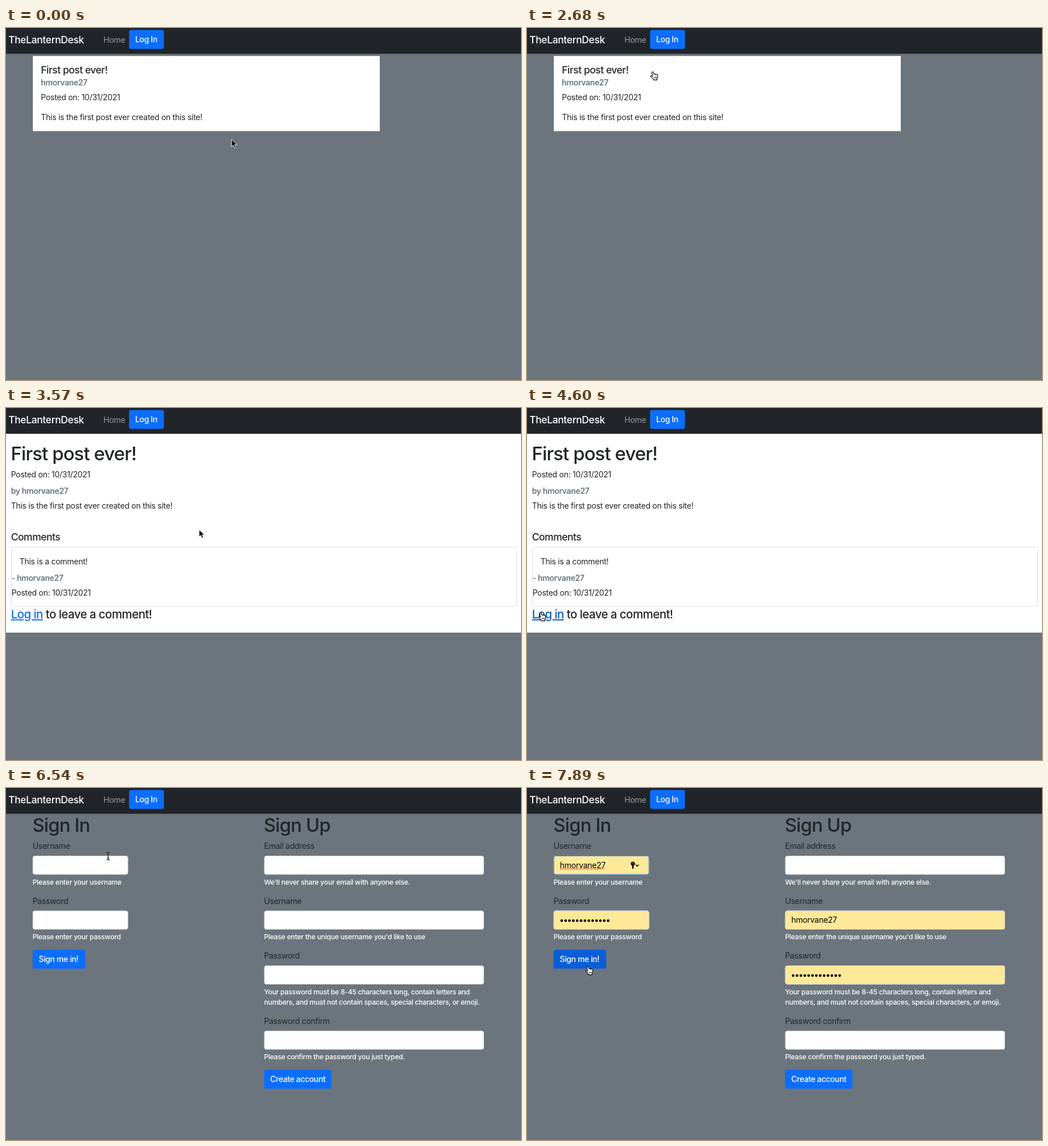
An HTML page for the animation above (8 s loop, 905 by 619 pixels).

```html
<!DOCTYPE html>
<html lang="en">
<head>
<meta charset="utf-8">
<title>Forum walkthrough</title>
<style>
  html, body { margin: 0; width: 100%; height: 100%; overflow: hidden; background: #6c757d; }
  svg { display: block; }
  text { font: 14px Inter, "Open Sans", sans-serif; letter-spacing: -.0195em; fill: #212529; white-space: pre; }
  .brand { font-size: 17.4px; font-weight: 550; fill: #fff; }
  .nav { fill: #9b9d9f; }
  .h1 { font-size: 32.8px; font-weight: 500; letter-spacing: -.026em; }
  .h4 { font-size: 20.5px; font-weight: 550; letter-spacing: -.028em; }
  .h5 { font-size: 17.5px; font-weight: 550; letter-spacing: -.028em; }
  .muted { font-weight: 600; letter-spacing: -.026em; fill: #6c757d; }
  .help { font-size: 12.2px; font-weight: 500; letter-spacing: -.022em; fill: #fff; }
  .btn { font-weight: 550; letter-spacing: -.028em; fill: #fff; }
  .fill { fill: #000; }
  #link { fill: #0d6efd; text-decoration: underline; }
</style>
</head>
<body>
<svg id="stage" width="905" height="619" viewBox="0 0 905 619"></svg>
<script>
const BRAND = "TheLanternDesk", USER = "hmorvane27";
const POSTED = "Posted on: 10/31/2021", BODY = "This is the first post ever created on this site!";
const BLUE = "#0d6efd", YELLOW = "#fee998";

const text = (x, y, str, cls = "") => `<text x="${x}" y="${y}" class="${cls}">${str}</text>`;
const box = (x, y, w, h, fill, extra = "") =>
  `<rect x="${x}" y="${y}" width="${w}" height="${h}" fill="${fill}" ${extra}/>`;
const input = (x, y, w, fill = "#fff", stroke = "#ced4da") =>
  box(x + .5, y + .5, w - 1, 32.5, fill, `rx="3.5" stroke="${stroke}"`);
const button = (x, y, w, str, id = "") =>
  box(x, y, w, 33.3, BLUE, `rx="3.5" id="${id}"`) + text(x + 10.8, y + 21.8, str, "btn");
const dots = (x, y) =>
  `<path d="M${x} ${y}h82" stroke="#000" stroke-width="4.8" stroke-linecap="round" stroke-dasharray="0 6.8"/>`;
const group = (id, ...parts) => `<g id="${id}">${parts.join("")}</g>`;

// One labelled field: label, input, then help lines
const field = (x, y, w, label, ...help) =>
  text(x, y, label) + input(x, y + 12, w) +
  help.map((line, i) => text(x, y + 62.5 + i * 18.4, line, "help")).join("");

const R = 453.5, RW = 386.5;

stage.innerHTML = [
  box(0, 0, 905, 619, "#6c757d"),
  group("list",
    box(47, 49, 610, 132.5, "#fff"),
    box(47.5, 49.5, 609.5, 131.5, "none", 'stroke="#000" stroke-opacity=".125"'),
    text(61.3, 80, "First post ever!", "h5"),
    text(61.3, 101, USER, "muted"),
    text(61.3, 127, POSTED),
    text(61.3, 162, BODY)),
  group("post",
    box(0, 45, 905, 350, "#fff"),
    text(8.5, 92, "First post ever!", "h1"),
    text(8.7, 122, POSTED),
    text(8.7, 150.5, "by " + USER, "muted"),
    text(8.7, 176.5, BODY),
    text(8.7, 233, "Comments", "h5"),
    box(9.5, 244.5, 888, 104.5, "#fff", 'rx="3.5" stroke="#dfdfdf"'),
    text(23.7, 275, "This is a comment!"),
    text(9.7, 303.5, "- " + USER, "muted"),
    text(9.7, 329.5, POSTED),
    text(8.7, 369.5, '<tspan id="link">Log in</tspan> to leave a comment!', "h4")),
  group("forms",
    text(46.5, 77, "Sign In", "h1"),
    field(46.7, 107, 168, "Username", "Please enter your username"),
    field(46.7, 203.5, 168, "Password", "Please enter your password"),
    button(46.7, 284.4, 92.5, "Sign me in!", "submit"),
    text(R - .5, 77, "Sign Up", "h1"),
    field(R, 107, RW, "Email address", "We'll never share your email with anyone else."),
    field(R, 203.5, RW, "Username", "Please enter the unique username you'd like to use"),
    field(R, 300, RW, "Password", "Your password must be 8-45 characters long, contain letters and",
      "numbers, and must not contain spaces, special characters, or emoji."),
    field(R, 414.7, RW, "Password confirm", "Please confirm the password you just typed."),
    button(R, 495.5, 118.5, "Create account"),
    group("filled",
      input(46.7, 119, 168, YELLOW, "#3f87dd"),
      text(57.8, 140.5, USER, "fill"),
      '<path d="M58 142.5h77" stroke="#e0302a" stroke-width="1.4" stroke-dasharray="1.5 1.2"/>',
      '<circle cx="186" cy="133" r="3.6"/><path d="M184.7 135h2.6v6l-1.3 1.5-1.3-1.5z"/>',
      '<circle cx="186" cy="131.6" r=".9" fill="#fee998"/>',
      '<path d="M191 134.8l2.7 2.6 2.7-2.6" fill="none" stroke="#000" stroke-width="1.5"/>',
      input(46.7, 215.5, 168, YELLOW), dots(61, 233.3),
      input(R, 215.5, RW, YELLOW), text(464.5, 237, USER, "fill"),
      input(R, 312, RW, YELLOW), dots(467.7, 329.8))),
  box(0, 0, 905, 45.4, "#212529"),
  text(4.2, 26.8, BRAND, "brand"),
  text(171.3, 25.8, "Home", "nav"),
  button(216.3, 3.4, 61.2, "Log In"),
  group("cursor",
    '<path id="arrow" d="M.3 0v12.6l3-2.8 2 4.7 2.4-1-2-4.6h4z" fill="#000" stroke="#fff" stroke-width=".9"/>',
    `<path id="hand" d="M-1.6 1.3C-1.6-.4.7-.5 1.1 1L2.2 4.4C3 3 3.9 3.3 4.6 4.6 5.4 3.8 6.4 4 6.9 5
      7.8 4.4 8.5 5 8.6 6.3V9.5L7.4 12V14.4H1.2L.6 12.3-3.4 8.6C-4.3 7.4-2.8 6.4-1.6 7.4L-.4 8.2Z"
      fill="#fff" stroke="#000" stroke-width="1.1" stroke-linejoin="round"/>
      <path id="knuckles" d="M2.6 8.8v3M4.5 8.8v3M6.3 8.8v3" stroke="#000" stroke-width=".8"/>`,
    `<path id="beam" d="M-3-6.5Q0-6.5 0-4.5 0-6.5 3-6.5M0-4.5V4.5M-3 6.5Q0 6.5 0 4.5 0 6.5 3 6.5M-1.5 2.5h3"
      fill="none" stroke="#111" stroke-width="1.1"/>`)
].join("");

// Each move: first step, last step, then the pointer at every step
const moves = [
  [0, 0, [396, 196]],
  [140, 880, [382, 186], [338, 157, "hand"], [287, 119, "hand"], [248, 92, "hand"], [227, 79, "hand"], [219, 75, "hand"]],
  [2680, 3710, [221, 77, "hand"], [232, 95, "hand"], [262, 135, "hand"], [306, 184], [346, 214], [362, 223], [339, 214], [334, 211]],
  [3860, 4600, [318, 222], [265, 254], [180, 304], [98, 342], [45, 357, "hand"], [24, 360, "hand"]],
  [5350, 6390, [28, 355, "hand"], [60, 325], [120, 265], [178, 205], [213, 160], [212, 134], [195, 119], [182.5, 116]],
  [6540, 7440, [179.5, 120, "beam"], [179, 122, "beam"], [181, 125, "beam"], [184, 126, "beam"],
    [186, 125, "beam"], [186, 124, "beam"], [186, 124, "beam"]],
  [7590, 7890, [168, 185], [127, 275], [107, 314, "hand"]]
];

function pointer(t) {
  const [start, end, ...points] = moves.findLast(m => t >= m[0]);
  const gap = (end - start) / (points.length - 1) || 1;
  const i = Math.floor((t - start + 5) / gap);
  return points[Math.min(i, points.length - 1)];
}

const byId = id => document.getElementById(id);
const show = (id, on) => byId(id).setAttribute("display", on ? "inline" : "none");

function draw(t) {
  show("list", t < 3565);
  show("post", t >= 3565 && t < 6540);
  show("forms", t >= 6540);
  show("filled", t >= 6985);
  byId("link").style.fill = t >= 4447 ? "#0a58ca" : BLUE;
  byId("submit").setAttribute("fill", t >= 7885 ? "#0b5ed7" : BLUE);
  const [x, y, kind = "arrow"] = pointer(t);
  byId("cursor").setAttribute("transform", `translate(${x} ${y})`);
  for (const id of ["arrow", "hand", "beam"]) show(id, id === kind);
  show("knuckles", kind === "hand");
}

const origin = performance.now();
function tick() {
  draw((performance.now() - origin) % 8000);
  requestAnimationFrame(tick);
}
tick();
</script>
</body>
</html>
```
